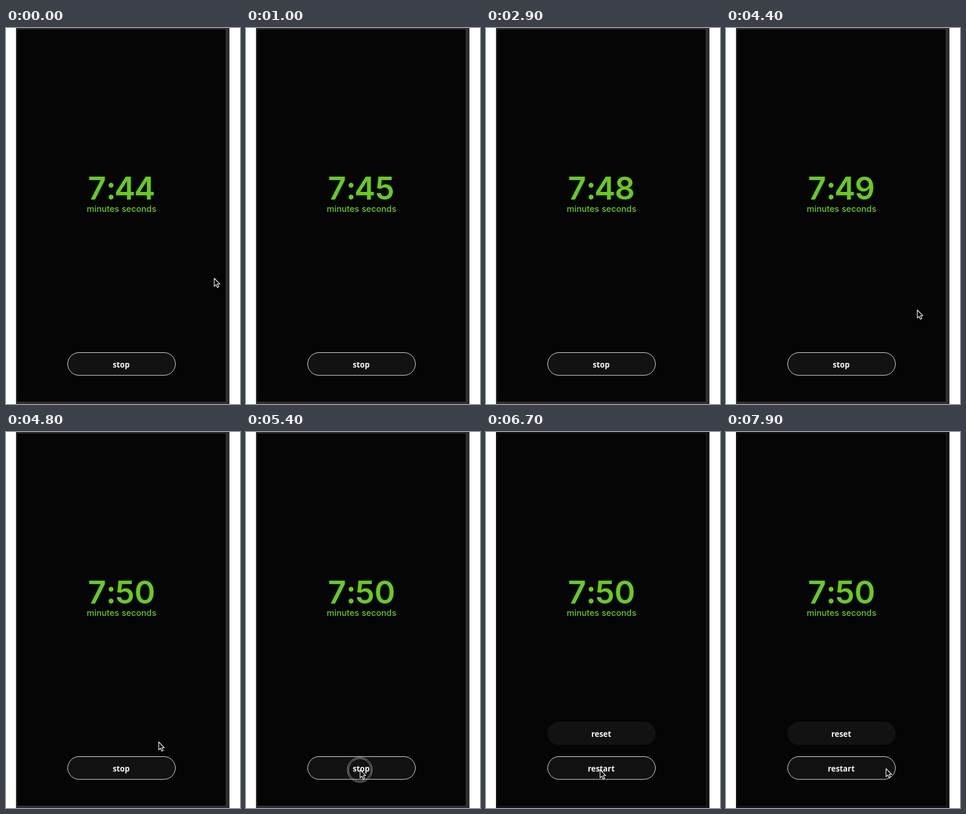
Recreate the animation shown at these times as an HTML page. Size 400 by 640 pixels, loop 8 s.

```html
<!DOCTYPE html>
<html lang="en">
<head>
<meta charset="utf-8">
<title>Stopwatch</title>
<style>
  html, body { margin: 0; width: 100%; height: 100%; overflow: hidden; background: #fff; }
  svg { display: block; width: 400px; height: 640px; }
  .clock { font: 600 54px Inter, sans-serif; fill: #66cc1a; text-anchor: middle; }
  .unit { font: 500 14.6px Inter, sans-serif; fill: #66cc1a; }
  .label { font: 700 13.3px "Noto Sans", sans-serif; fill: #f4f4f4; text-anchor: middle; }
  .button { fill: #121212; }
  .ring { fill: none; stroke: #a8a8a8; stroke-width: .9; }
</style>
</head>
<body>
<svg viewBox="0 0 400 640">
  <rect id="bezel" x="17" width="365" height="640"/>
  <rect x="19" y="2.5" width="356.5" height="633.5" rx="1.5" fill="#050505"/>
  <text id="clock" class="clock" x="155.5 179.5 203.2 237.2" y="292"></text>
  <text class="unit" x="138" y="312.5">minutes</text>
  <text class="unit" x="257" y="312.5" text-anchor="end">seconds</text>
  <g id="reset">
    <rect class="button" x="105" y="493" width="185" height="39.5" rx="19.75"/>
    <text class="label" x="197" y="518.5">reset</text>
  </g>
  <rect class="button" x="105.5" y="552.5" width="184" height="38.7" rx="19.35" stroke="#dedede"/>
  <text id="action" class="label" x="197" y="577.5"></text>
  <g id="click">
    <circle id="outer" class="ring" cx="194.5" cy="575"/>
    <circle id="inner" class="ring" cx="194.5" cy="575"/>
  </g>
  <path id="cursor" d="M.5 .5V14.2L3.6 11.3 5.8 16.2 8.2 15.1 6 10.3H10.2Z"
        fill="#080808" stroke="#fff" stroke-width="1.1" stroke-linejoin="round"/>
</svg>
<script>
  const LOOP = 8000, STEP = 100, STOPPED = 5500;
  const $ = id => document.getElementById(id);
  const progress = (t, from, to) => Math.min(1, Math.max(0, (t - from) / (to - from)));
  const ease = p => p * p * (3 - 2 * p);
  const mix = (a, b, p) => a + (b - a) * p;

  function cursorAt(t) {
    if (t < 4400) return [355.5, 425.5, 1 - progress(t, 100, 400)];
    if (t < 6900) {
      const p = ease(progress(t, 4400, 5200));
      return [mix(326.5, 194.5, p), mix(479.5, 574.5, p), 1];
    }
    const p = ease(progress(t, 6900, 7800));
    return [mix(194.5, 273, p), mix(574.5, 572.5, p), 1];
  }

  function draw(t) {
    const stopped = t >= STOPPED;
    const ticks = Math.floor((Math.min(t, STOPPED) + 700) / 900);
    $("clock").textContent = "7:" + (44 + ticks);
    $("bezel").setAttribute("fill", stopped ? "#141414" : "#2f2f2f");
    $("action").textContent = stopped ? "restart" : "stop";
    $("reset").setAttribute("opacity", stopped ? 1 : 0);

    const radius = 21.3 + (t - 5400) * .04;
    const ringOn = t >= 5300 && t < 5600;
    $("click").setAttribute("opacity", ringOn ? 1 - progress(t, 5400, 5600) : 0);
    $("outer").setAttribute("r", ringOn ? radius : 0);
    $("inner").setAttribute("r", ringOn ? radius - 2.2 : 0);

    const [x, y, alpha] = cursorAt(t);
    $("cursor").setAttribute("transform", `translate(${x} ${y})`);
    $("cursor").setAttribute("opacity", alpha);
  }

  const start = performance.now();
  function frame() {
    const t = (performance.now() - start) % LOOP;
    draw(Math.floor(t / STEP) * STEP);
    requestAnimationFrame(frame);
  }
  frame();
</script>
</body>
</html>
```
